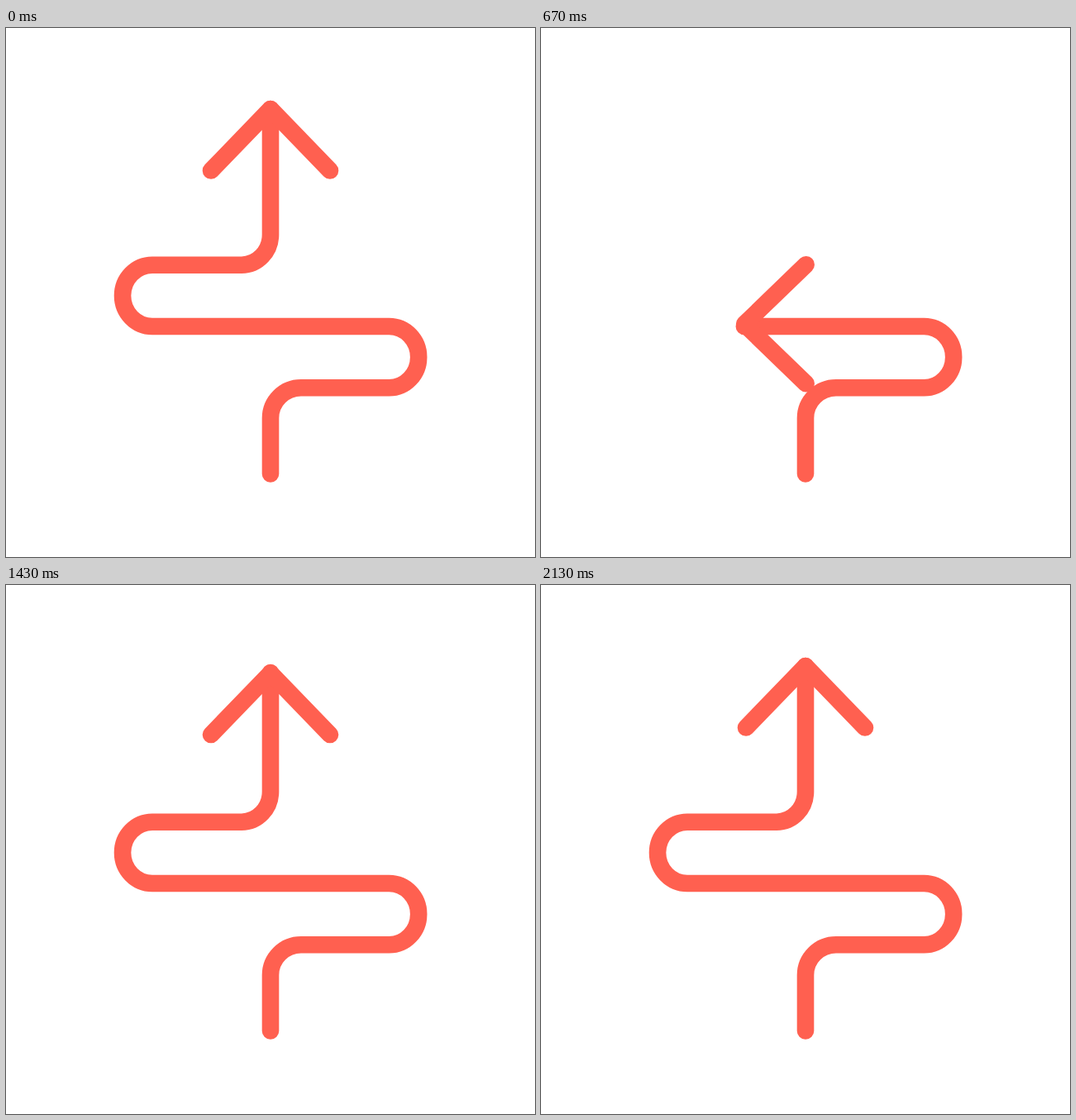
Write an HTML page that moves like this. It is 640 by 640 pixels and loops after 3000 ms.

```html
<!DOCTYPE html>
<html lang="en">
<head>
<meta charset="utf-8">
<title>Winding arrow</title>
<style>
  html, body { margin: 0; width: 100%; height: 100%; overflow: hidden; background: #fff; }
  svg { display: block; width: 100%; height: 100%; }
  path { fill: none; stroke: #ff6050; stroke-width: 20.6; stroke-linecap: round; stroke-linejoin: round; }
</style>
</head>
<body>
<svg viewBox="0 0 640 640">
  <path id="trail" d="M320 539.5V472A37 36.7 0 0 1 357 435.3H463.5A35.7 37.15 0 0 0 463.5 361H177A36 37.15 0 0 1 177 286.7H285A35 36.7 0 0 0 320 250V98"/>
  <path id="head" d="M-72 74.5L0 0L72 74.5"/>
</svg>
<script>
const LOOP = 3000;
const STEP = 30; // the head points along its travel over this time
const PULL = 624, RECOIL = 155;
const trail = document.getElementById('trail');
const head = document.getElementById('head');
const total = trail.getTotalLength();

// 0 to 1 with a soft start and end between two times
function ease(t, from, to) {
  const u = Math.min(1, Math.max(0, (t - from) / (to - from)));
  return (1 - Math.cos(Math.PI * u)) / 2;
}

// draw back, release, recoil, settle
function lengthAt(t) {
  const pull = PULL * (ease(t, 0, 950) - ease(t, 1070, 1380));
  const recoil = RECOIL * (ease(t, 1380, 1718) - ease(t, 1718, 2135));
  return total - pull - recoil;
}

// angle of the trail from one length to a greater one, 0 points up
function heading(from, to) {
  const a = trail.getPointAtLength(from);
  const b = trail.getPointAtLength(to);
  return Math.atan2(b.x - a.x, a.y - b.y) * 180 / Math.PI;
}

function draw(t) {
  const now = lengthAt(t);
  const before = lengthAt(t - STEP);
  const upper = Math.max(now, before);
  const lower = Math.min(now, before, upper - 1);
  const tip = trail.getPointAtLength(now);
  // the head floats slightly above the trail while drawn back
  const lift = 3 * Math.sin(Math.PI * Math.min(1, t / 1070));
  trail.setAttribute('stroke-dasharray', `${now} ${total + 50}`);
  head.setAttribute('transform',
    `translate(${tip.x} ${tip.y - lift}) rotate(${heading(lower, upper)})`);
}

const start = performance.now();
function frame() {
  draw((performance.now() - start) % LOOP);
  requestAnimationFrame(frame);
}
frame();
</script>
</body>
</html>
```
